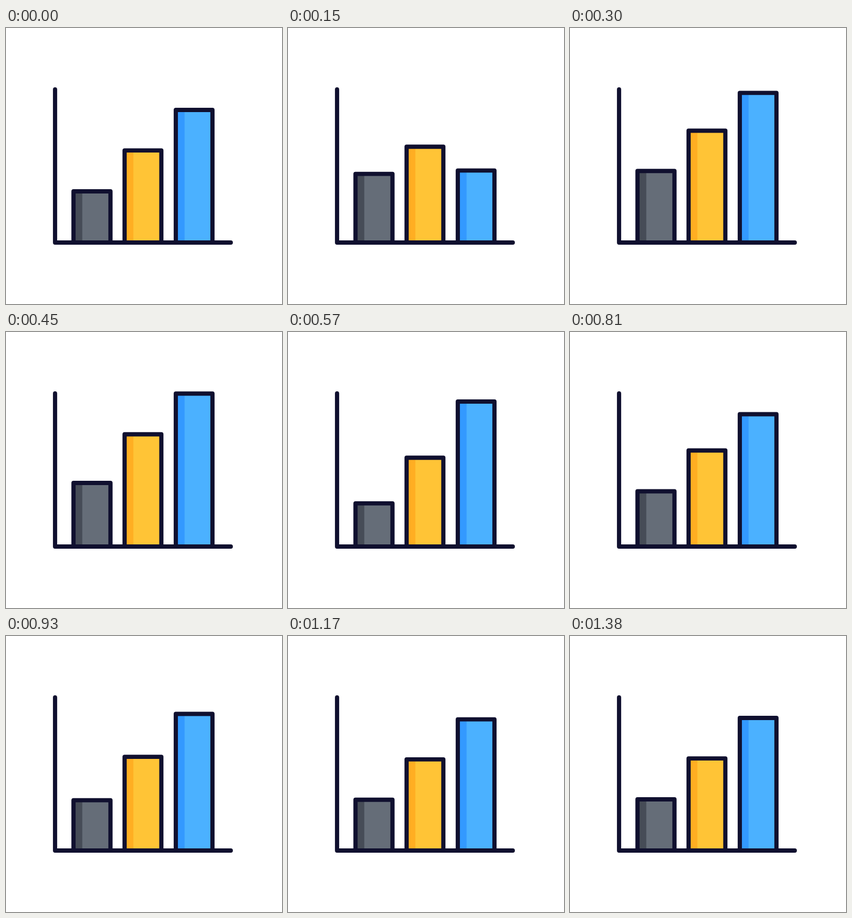
Write an HTML page with a canvas that moves like this. It is 512 by 512 pixels and loops after 3.44 s.

```html
<!DOCTYPE html>
<html lang="en">
<head>
<meta charset="utf-8">
<title>Bar chart</title>
<style>
  html, body { margin: 0; width: 100%; height: 100%; overflow: hidden; background: #fff; }
  canvas { display: block; width: 100vw; height: 100vh; }
</style>
</head>
<body>
<canvas id="stage" width="512" height="512"></canvas>
<script>
const ctx = document.getElementById('stage').getContext('2d');

const LOOP = 3440, STEP = 30, END = 46;
const BASE = 398, LINE = 7.8, INK = '#10102f';
const PEAK = 38, RISE = 12.3;

const bars = [
  { left: 125.2, right: 193.8, top: 303, fill: '#656d78', shade: '#464c57', delay: 0 },
  { left: 220, right: 288.2, top: 227.2, fill: '#ffc436', shade: '#ffae22', delay: 2 },
  { left: 315, right: 383, top: 152, fill: '#4bb1ff', shade: '#3399ff', delay: 4 }
];

// Swings after the rise: start, end, from, to (px above rest), steepness
const swings = [
  [RISE, 19.2, PEAK, -15, 2.1],
  [19.2, 25.8, -15, 8.4, 1.6],
  [25.8, 32.6, 8.4, -3.2, 1.6],
  [32.6, 42, -3.2, 0, 1.6]
];

function ease(u, p) {
  const a = u ** p, b = (1 - u) ** p;
  return a / (a + b);
}

// Current height of a bar, s steps after it starts to grow
function heightAt(s, rest) {
  if (s <= 0) return 0;
  if (s < RISE) return (rest + PEAK) * (1 - 2 ** (-11 * s / 12)) ;
  const swing = swings.find(w => s < w[1]);
  if (!swing) return rest;
  const [start, end, from, to, p] = swing;
  return rest + from + (to - from) * ease((s - start) / (end - start), p);
}

function stroke(points) {
  ctx.beginPath();
  points.forEach(([x, y]) => ctx.lineTo(x, y));
  ctx.stroke();
}

function drawBar({ left, right, top, fill, shade }, height) {
  if (height <= 0) return;
  const y = BASE - height;
  ctx.fillStyle = fill;
  ctx.fillRect(left, y, right - left, height);
  ctx.fillStyle = shade;
  ctx.fillRect(left, y, 16.3, height);
  stroke([[left, BASE], [left, y], [right, y], [right, BASE]]);
}

function draw(time) {
  const step = Math.floor((time % LOOP) / STEP);
  const resting = step === 0 || step >= END;
  ctx.fillStyle = '#fff';
  ctx.fillRect(0, 0, 512, 512);
  ctx.strokeStyle = INK;
  ctx.lineWidth = LINE;
  ctx.lineCap = ctx.lineJoin = 'round';

  ctx.save();
  ctx.beginPath();
  ctx.rect(0, 0, 512, BASE);
  ctx.clip();
  for (const bar of bars) {
    const rest = BASE - bar.top;
    drawBar(bar, resting ? rest : heightAt(step - bar.delay, rest));
  }
  ctx.restore();

  stroke([[91, 114], [91, BASE], [417, BASE]]);
}

let origin;
function tick(now) {
  origin ??= now;
  draw(now - origin + 0.5);
  requestAnimationFrame(tick);
}
draw(0);
requestAnimationFrame(tick);
</script>
</body>
</html>
```
